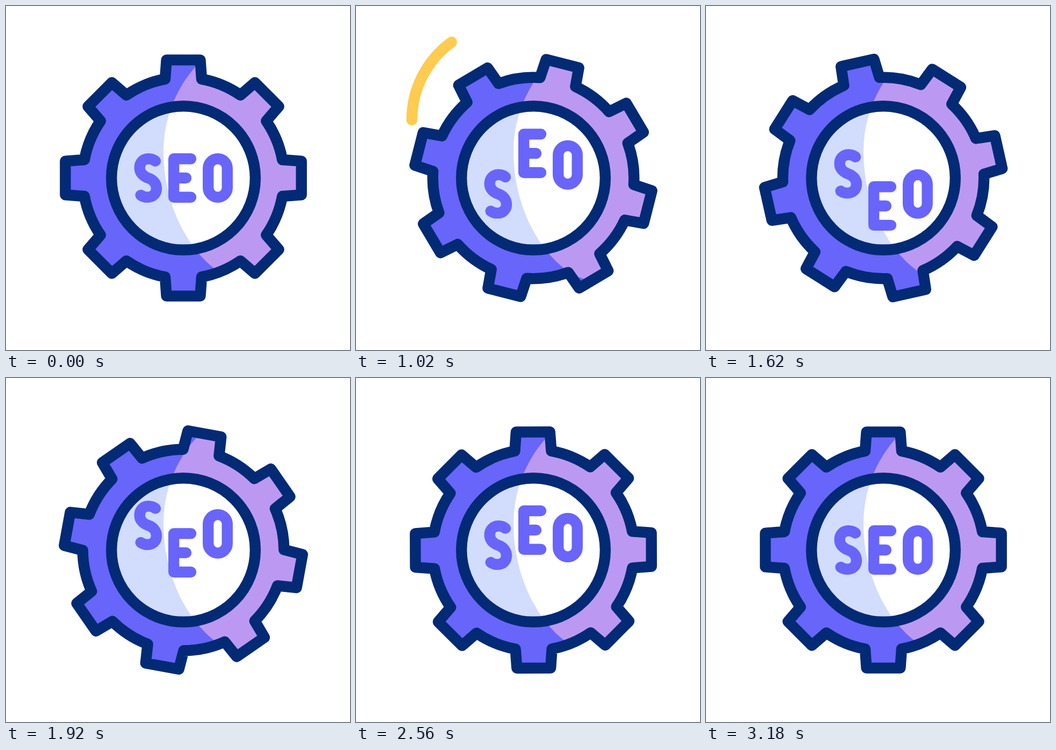
Recreate the animation shown at these times as an HTML page. Size 640x640 px, loop 3.6 s.

```html
<!DOCTYPE html>
<html lang="en">
<head>
<meta charset="utf-8">
<title>SEO gear</title>
<style>
  html, body { margin: 0; width: 100%; height: 100%; overflow: hidden; background: #fff; }
  svg { display: block; width: 100%; height: 100%; }
  .line { fill: none; stroke-width: 20.4; stroke-linecap: round; stroke-linejoin: round; }
  .navy { stroke: #032a75; }
  .ink { stroke: #6965fa; }
</style>
</head>
<body>
<svg viewBox="0 0 640 640" role="img" aria-label="SEO">
  <defs>
    <path id="gear"/>
    <path id="lit" d="M367 98A238 238 0 0 0 293 270C293 360 330 442 387 488L398 497Q408 503 425 508L640 590V98Z"/>
    <clipPath id="gearClip"><path id="gearClipShape"/></clipPath>
    <clipPath id="discClip"><circle cx="330" cy="320" r="134"/></clipPath>
  </defs>
  <path id="swoosh" class="line" stroke="#ffcb50"/>
  <use href="#gear" class="spin" fill="#6865fa"/>
  <g clip-path="url(#gearClip)"><use href="#lit" fill="#bb99f2"/></g>
  <use href="#gear" class="spin line navy"/>
  <circle cx="330" cy="320" r="134" fill="#d2dcfd"/>
  <g clip-path="url(#discClip)"><use href="#lit" fill="#fff"/></g>
  <circle class="line navy" cx="330" cy="320" r="133.800"/>
  <path id="letterS" class="line ink" d="M278 288.500C274 285.500 270 284.200 265 284.200C255 284.200 248.700 291.500 248.700 301C248.700 311 256 317 264.500 320C273.500 323 280 330 280 339.500C280 349.500 273 355.800 263 355.800C258 355.800 254 354.500 250.700 352"/>
  <path id="letterE" class="line ink" d="M344 284.200H312.200V355.800H344M312.200 320H335"/>
  <rect id="letterO" class="line ink" x="376.200" y="284.200" width="35.500" height="71.600" rx="17.750"/>
</svg>
<script>
const LOOP = 3600, STEP = 20, LAST = 150;
const $ = id => document.getElementById(id);
const clamp = (v, lo, hi) => Math.min(hi, Math.max(lo, v));
const polar = (cx, cy, r, deg) => {
  const a = deg * Math.PI / 180;
  return `${(cx + r * Math.cos(a)).toFixed(2)} ${(cy + r * Math.sin(a)).toFixed(2)}`;
};

// Cubic ease in and out, control points (.385, 0) and (.616, 1).
function ease(x) {
  let lo = 0, hi = 1;
  for (let i = 0; i < 24; i++) {
    const s = (lo + hi) / 2, r = 1 - s;
    if (3 * s * r * (0.385 * r + 0.616 * s) + s * s * s < x) lo = s; else hi = s;
  }
  return lo * lo * (3 - 2 * lo);
}

// Eased value along a list of [step, value] keys.
function track(keys, k) {
  if (k <= keys[0][0]) return keys[0][1];
  for (let i = 1; i < keys.length; i++) {
    const [k0, v0] = keys[i - 1], [k1, v1] = keys[i];
    if (k < k1) return v0 + (v1 - v0) * ease((k - k0) / (k1 - k0));
  }
  return keys[keys.length - 1][1];
}

function gearPath() {
  const tooth = [[-34, -184.1], [-31.4, -219.6], [31.4, -219.6], [34, -184.1]];
  let d = "";
  for (let i = 0; i < 8; i++) {
    const a = i * Math.PI / 4, c = Math.cos(a), s = Math.sin(a);
    tooth.forEach(([x, y], j) => {
      const p = `${(330 + x * c - y * s).toFixed(2)} ${(320 + x * s + y * c).toFixed(2)}`;
      d += (j ? "L" : i ? "A187.200 187.200 0 0 1 " : "M") + p;
    });
  }
  return d + "A187.200 187.200 0 0 1 296 135.900Z";
}

const SPIN = [[0, 0], [15, -20], [LAST, 360]];
const BOUNCE = [[0, 0], [25, -46], [50.5, 54], [88, -46], [132, 0]];
const LETTERS = [["letterS", 0], ["letterO", 9], ["letterE", 18]];
const ARC = { x: 283, y: 212, r: 179, from: 180, to: 309 };
const HEAD = [[33, 0], [53, 1]], TAIL = [[44, 0], [64, 1]];

$("gear").setAttribute("d", gearPath());
$("gearClipShape").setAttribute("d", gearPath());
const spinning = [...document.querySelectorAll(".spin"), $("gearClipShape")];

function drawSwoosh(k) {
  const head = track(HEAD, k), tail = track(TAIL, k);
  const at = f => polar(ARC.x, ARC.y, ARC.r, ARC.from + (ARC.to - ARC.from) * f);
  const d = head > tail ? `M${at(tail)}A${ARC.r} ${ARC.r} 0 0 1 ${at(head)}` : "";
  $("swoosh").setAttribute("d", d);
}

function render(ms) {
  const k = clamp(Math.floor((ms % LOOP) / STEP) - 9, 0, LAST);
  const turn = `rotate(${track(SPIN, k).toFixed(3)} 330 320)`;
  spinning.forEach(el => el.setAttribute("transform", turn));
  LETTERS.forEach(([id, delay]) =>
    $(id).setAttribute("transform", `translate(0 ${track(BOUNCE, k - delay).toFixed(2)})`));
  drawSwoosh(k);
}

let start;
function tick(now) {
  start ??= now;
  render(now - start);
  requestAnimationFrame(tick);
}
render(0);
requestAnimationFrame(tick);
</script>
</body>
</html>
```
